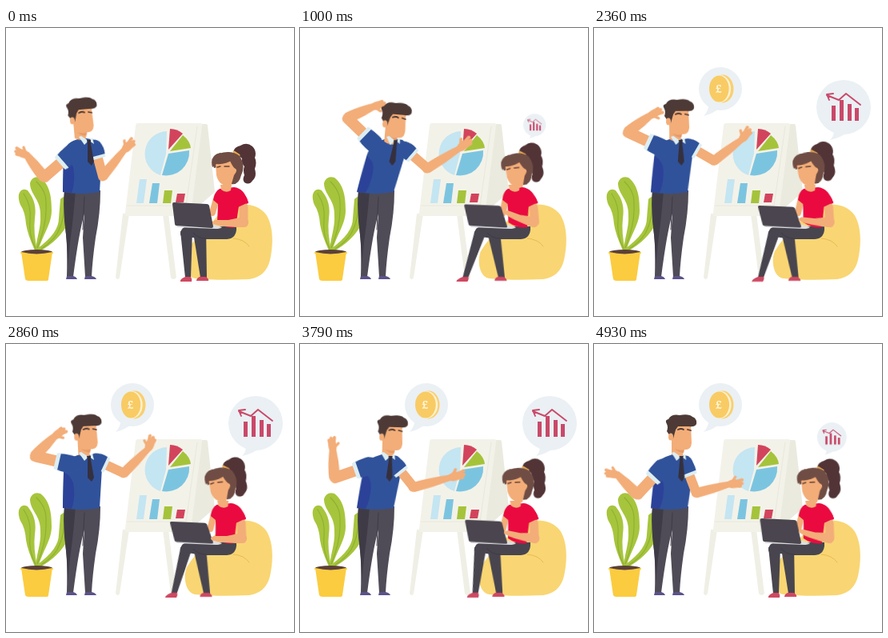
Write an HTML page without scripts that moves like this. It is 360 px wide and 360 px high and loops after 5000 ms.

```html
<!DOCTYPE html>
<html lang="en">
<head>
<meta charset="utf-8">
<title>Team presentation</title>
<style>
html, body { margin: 0; width: 100%; height: 100%; overflow: hidden; background: #fff; }
svg { display: block; width: 100vw; height: 100vh; }
svg * { animation: 5s ease-in-out infinite; }
.line { fill: none; stroke-linecap: round; stroke-linejoin: round; }
.skin { fill: #f3ad78; }
.skin-line { stroke: #f3ad78; }
.shirt { fill: #30529a; }
.cuff { fill: #dceef3; }
.trousers { fill: #4f4b57; }
.w-trousers { fill: #48454f; }
.bubble { fill: #eaf0f4; }
.leaf { fill: #a7c53c; }
.vein { stroke: #8fb034; stroke-width: 1.2; }

/* presenter */
.torso { animation-name: torso; transform-origin: 95px 205px; }
.head { animation-name: head; transform-origin: 111px 140px; }
.l-arm { animation-name: l-arm; }
.l-fore { animation-name: l-fore; }
.l-hand { animation-name: l-hand; }
.r-arm { animation-name: r-arm; }
.r-fore { animation-name: r-fore; }
.r-hand { animation-name: r-hand; }

@keyframes torso {
  0%, 57.2% { transform: skewX(0deg); }
  20% { transform: skewX(-14deg); }
  37.2% { transform: skewX(-8.5deg); }
  65.8% { transform: skewX(-5deg); }
  84.2% { transform: skewX(-11deg); }
  98.6%, 100% { transform: skewX(-5deg); }
}
@keyframes head {
  0% { transform: translate(-11px, -1.5px) rotate(-5deg); }
  20% { transform: translate(8px, 5px) rotate(5deg); }
  37.2% { transform: translate(1px, 2px) rotate(2deg); }
  57.2% { transform: translate(-6.5px, -.5px) rotate(-3deg); }
  65.8% { transform: translate(0, 0) rotate(0deg); }
  84.2% { transform: translate(9.5px, 1.5px) rotate(3deg); }
  98.6%, 100% { transform: translate(0, 0) rotate(0deg); }
}
@keyframes l-arm {
  0% { transform: translate(84px, 155px) rotate(139deg); }
  20% { transform: translate(94px, 146px) rotate(224deg); }
  37.2% { transform: translate(89px, 150px) rotate(217deg); }
  57.2% { transform: translate(83px, 151px) rotate(193deg); }
  65.8% { transform: translate(87px, 151px) rotate(184deg); }
  84.2% { transform: translate(90px, 152px) rotate(144deg); }
  98.6%, 100% { transform: translate(87px, 153px) rotate(133deg); }
}
@keyframes l-fore {
  0% { transform: translate(48px, 0) rotate(93deg); }
  20% { transform: translate(48px, 0) rotate(112deg); }
  37.2% { transform: translate(48px, 0) rotate(115deg); }
  57.2% { transform: translate(48px, 0) rotate(122deg); }
  65.8% { transform: translate(48px, 0) rotate(110deg); }
  84.2% { transform: translate(48px, 0) rotate(102deg); }
  98.6%, 100% { transform: translate(48px, 0) rotate(92deg); }
}
@keyframes l-hand {
  0% { transform: translate(35px, 0) rotate(-30deg); }
  20%, 65.8% { transform: translate(35px, 0) rotate(10deg); }
  84.2% { transform: translate(35px, 0) rotate(-10deg); }
  98.6%, 100% { transform: translate(35px, 0) rotate(-35deg); }
}
@keyframes r-arm {
  0% { transform: translate(111px, 148px) rotate(75deg); }
  20% { transform: translate(130px, 150px) rotate(41deg); }
  37.2% { transform: translate(121px, 148px) rotate(35deg); }
  57.2% { transform: translate(112px, 145px) rotate(25deg); }
  65.8% { transform: translate(116px, 147px) rotate(27deg); }
  84.2% { transform: translate(119px, 150px) rotate(69deg); }
  98.6%, 100% { transform: translate(114px, 150px) rotate(69deg); }
}
@keyframes r-fore {
  0% { transform: translate(39px, 0) rotate(-126deg) scaleX(1); }
  20% { transform: translate(39px, 0) rotate(-73deg) scaleX(1.1); }
  37.2% { transform: translate(39px, 0) rotate(-65deg) scaleX(1.03); }
  57.2% { transform: translate(39px, 0) rotate(-70deg) scaleX(1); }
  65.8% { transform: translate(39px, 0) rotate(-51deg) scaleX(1); }
  84.2% { transform: translate(39px, 0) rotate(-77deg) scaleX(1.18); }
  98.6%, 100% { transform: translate(39px, 0) rotate(-84deg) scaleX(1); }
}
@keyframes r-hand {
  0% { transform: translate(43px, 0) rotate(5deg); }
  20%, 37.2% { transform: translate(43px, 0) rotate(-8deg); }
  57.2% { transform: translate(43px, 0) rotate(-25deg); }
  65.8% { transform: translate(43px, 0) rotate(-14deg); }
  84.2%, 98.6%, 100% { transform: translate(43px, 0) rotate(8deg); }
}

/* seated colleague */
.w-torso { animation-name: w-torso; transform-origin: 280px 248px; }
.w-head { animation-name: w-head; transform-origin: 272px 195px; }
.pony { animation-name: pony; }
.w-fore { animation-name: w-fore; transform-origin: 297px 243px; }
.laptop { animation-name: laptop; transform-origin: 235px 248px; }
.near-shin { animation-name: near-shin; transform-origin: 226px 255px; }
.far-shin { animation-name: far-shin; transform-origin: 240px 255px; }

@keyframes w-torso {
  0% { transform: translate(0) skewX(0deg); }
  20% { transform: translate(-3px) skewX(5deg); }
  37.2% { transform: translate(-2px) skewX(5deg); }
  57.2%, 65.8% { transform: translate(-2px) skewX(2deg); }
  84.2% { transform: translate(-5px) skewX(2deg); }
  98.6%, 100% { transform: translate(-2px) skewX(2deg); }
}
@keyframes w-head {
  0% { transform: translate(0, 0) rotate(0deg); }
  20% { transform: translate(-3px, 2px) rotate(-6deg); }
  37.2% { transform: translate(-6px, 1px) rotate(-6deg); }
  57.2%, 65.8% { transform: translate(-6px, 0) rotate(-6deg); }
  84.2% { transform: translate(-1px, 0) rotate(0deg); }
  98.6%, 100% { transform: translate(-2px, 0) rotate(-3deg); }
}
@keyframes pony {
  0%, 84.2% { transform: translate(-1px, 0); }
  20%, 65.8% { transform: translate(-4px, -1px); }
  98.6%, 100% { transform: translate(-2px, 0); }
}
@keyframes w-fore {
  0% { transform: translate(0) rotate(0deg); }
  20%, 84.2% { transform: translate(-5px) rotate(20deg); }
  37.2% { transform: translate(-3px) rotate(12deg); }
  57.2%, 65.8% { transform: translate(-2px) rotate(0deg); }
  98.6%, 100% { transform: translate(-3px) rotate(14deg); }
}
@keyframes laptop {
  0% { transform: skewX(0deg); }
  20% { transform: skewX(6deg) scaleY(.92); }
  37.2%, 65.8% { transform: skewX(7deg) scaleY(.87); }
  84.2%, 98.6%, 100% { transform: skewX(1deg); }
}
@keyframes near-shin {
  0% { transform: skewX(0deg); }
  20%, 37.2% { transform: skewX(-20deg); }
  57.2% { transform: skewX(-17deg); }
  65.8% { transform: skewX(-13deg); }
  84.2% { transform: skewX(-5deg); }
  98.6%, 100% { transform: skewX(0deg); }
}
@keyframes far-shin {
  0%, 98.6%, 100% { transform: skewX(0deg); }
  20%, 37.2% { transform: skewX(5deg); }
  65.8% { transform: skewX(4deg); }
  84.2% { transform: skewX(1deg); }
}

/* speech bubbles */
.idea-coin { animation-name: idea-coin; animation-timing-function: linear; transform-origin: 140px 106px; }
.idea-chart { animation-name: idea-chart; animation-timing-function: linear; transform-origin: 280px 137px; }
.coin-face { animation: coin-turn 1.4s ease-in-out infinite alternate; transform-origin: 144px 76px; }

@keyframes idea-coin {
  0%, 25% { transform: scale(0); }
  31%, 100% { transform: scale(1); }
}
@keyframes idea-chart {
  0%, 17.4% { transform: scale(0); }
  20% { transform: scale(.41); }
  22.8% { transform: scale(.92); }
  24.2%, 96% { transform: scale(1); }
  98.6%, 100% { transform: scale(.54); }
}
@keyframes coin-turn {
  from { transform: scaleX(.97); }
  to { transform: scaleX(1.04); }
}
</style>
</head>
<body>
<svg viewBox="0 0 360 360">
  <defs>
    <g id="hand">
      <ellipse class="skin" cx="5" rx="8" ry="5.5"/>
      <path class="line skin-line" stroke-width="4.2" d="M7-2 16-3.5M7 1 15.5 1M6 3 13 4"/>
      <path class="line skin-line" stroke-width="3.4" d="M3-2 8-8"/>
    </g>
  </defs>

  <!-- plant -->
  <path class="leaf" d="M68 214Q73 208 77 214V245Q66 266 42 279L39 276C58 262 66 250 66 238Z"/>
  <path class="leaf" d="M16 208Q19 199 27 203C36 214 38 225 36 238Q34 255 39 278H36Q27 258 25 245Q24 230 18 221Q15 214 16 208Z"/>
  <path class="leaf" d="M30 194Q33 184 43 187C55 196 57 212 57 228C57 245 46 258 40 279H37C38 262 44 250 43 234C44 215 30 208 30 194Z"/>
  <path class="line vein" d="M22 207Q32 222 30 240T37 276M38 192C52 206 50 216 50 228Q50 248 39 275M73 218Q74 238 64 257Q57 268 44 276"/>
  <path d="M19 280 24 314Q25 316 28 316H50Q53 316 53 314L58 280Z" fill="#fbcc40"/>
  <ellipse cx="38.5" cy="280" rx="19.5" ry="3" fill="#5b4039"/>
  <path d="M19 281Q38 286 58 281" class="line" stroke="#fbcc40" stroke-width="2"/>

  <!-- easel -->
  <path d="M146 232H154L142 312Q140 316 137 312ZM196 232H203L213 312Q209 316 206 312Z" fill="#efefe5"/>
  <path d="M240 120H250Q252 120 252 122L261 205 230 232Z" fill="#eaeadf"/>
  <path d="M165 119H243Q246 119 245 123L231 233Q231 235 228 235H151Q148 235 149 231L162 122Q162 119 165 119Z" fill="#f3f2e9"/>
  <path d="M239 123 225 222H151" class="line" stroke="#e9e8dc"/>
  <path d="M201 129A28.2 28.2 0 0 0 193 184L200 157Z" fill="#c4e5f2"/>
  <path d="M203 157 229 153A29 29 0 0 1 195 184Z" fill="#7bc4e0"/>
  <path d="M205 154 221 134Q230 141 231 150Z" fill="#a5c33a"/>
  <path d="M203 152 205 126Q214 126 221 132Z" fill="#d2445c"/>
  <path d="M167 189H176L172 219H163Z" fill="#c4e5f2"/>
  <path d="M183 194H192L189 219H179Z" fill="#7bc4e0"/>
  <path d="M198 203H208L206 219H196Z" fill="#a5c33a"/>
  <path d="M214 207H224L222 218H212Z" fill="#d2445c"/>

  <!-- coin bubble -->
  <g class="idea-coin">
    <path class="bubble" d="M144 94Q143 104 137 110Q149 107 157 100Z"/>
    <circle class="bubble" cx="158" cy="76" r="27"/>
    <ellipse cx="161" cy="76" rx="13.5" ry="17.5" fill="#f8d070"/>
    <g class="coin-face">
      <ellipse cx="158" cy="76" rx="13.5" ry="17" fill="#fdf1d2"/>
      <ellipse cx="156.5" cy="76" rx="12.5" ry="16.5" fill="#f8cb64"/>
      <text x="156" y="81" text-anchor="middle" font-family="Noto Serif, serif" font-size="14" font-weight="700" fill="#fff6de">£</text>
    </g>
  </g>

  <!-- chart bubble -->
  <g class="idea-chart">
    <path class="bubble" d="M299 122Q302 134 295 140Q309 137 317 130Z"/>
    <circle class="bubble" cx="312" cy="99" r="34"/>
    <path d="M297 97h5v19h-5zM307 90h5v26h-5zM317 95h5v21h-5zM326 100h5v16h-5z" fill="#ca4969"/>
    <path class="line" stroke="#ca4969" stroke-width="1.9" d="M333 96 315 82 306 90 291 84M299 82 291 83 294 90"/>
  </g>

  <!-- presenter -->
  <path class="trousers" d="M73 203H118Q118 232 112 262Q108 290 107 311H99L96 262 98 232Q91 256 84 311H76Q77 276 75 258Q71 229 73 203Z"/>
  <path d="M73 203H87Q84 240 80 268L77 298Q77 276 75 258Q71 229 73 203Z" fill="#3f3b46"/>
  <path d="M98 211 96 252" class="line" stroke="#3f3b46"/>
  <path d="M76 310H84Q88 311 89 314H75ZM99 310H107Q112 311 113 314H98Z" fill="#5c5288"/>
  <g class="torso">
    <path class="shirt" d="M95 137 84 141Q72 146 72 162L71 205Q94 209 117 205L120 155Q120 145 112 140Z"/>
    <path d="M72 160Q84 166 85 180Q86 196 82 206L71 205Z" fill="#2b4298"/>
  </g>
  <g class="l-arm">
    <path class="line skin-line" stroke-width="14" d="M10 0H46"/>
    <g class="l-fore">
      <path class="skin" d="M0-7Q14-8 37-4V4Q18 7 0 7Q-7 4-7 0T0-7Z"/>
      <g class="l-hand"><use href="#hand" transform="scale(.95 -.95)"/></g>
    </g>
    <path class="shirt" d="M0-11Q10-12 19-10V10Q8 12 0 11Q-9 8-9 0T0-11Z"/>
    <path class="cuff" d="M17-11 22-10V10L17 11Z"/>
  </g>
  <g class="r-arm">
    <path class="line skin-line" stroke-width="12" d="M8 0H38"/>
    <g class="r-fore">
      <path class="skin" d="M0-6Q15-7 45-3.5V3.5Q20 6 0 6Q-6 4-6 0T0-6Z"/>
      <g class="r-hand"><use href="#hand"/></g>
    </g>
    <path class="shirt" d="M0-9Q7-11 13-9.5V9.5Q6 11 0 9Q-8 7-8 0T0-9Z"/>
    <path class="cuff" d="M12-10 16-9.5V9.5L12 10Z"/>
  </g>
  <g class="head">
    <path class="skin" d="M97 99H121L122 124Q121 132 115 132H112L111 140Q104 143 97 138V121Z"/>
    <path d="M101 131Q107 134 113 132L112 136Q106 136 101 131Z" fill="#e39a68"/>
    <path d="M95 115 91 109Q93 104 91 100Q88 95 93 94Q97 87 107 89Q119 87 123 91Q129 93 128 100Q126 104 119 103L105 103Q102 106 101 111L99 118 97 117Z" fill="#4d3a36"/>
    <ellipse class="skin" cx="96" cy="116" rx="3" ry="4.5"/>
    <path class="line" stroke="#4d3a36" stroke-width="1.8" d="M105 107Q109 105 112 107M117 107 121 108"/>
  </g>
  <g class="torso">
    <path class="cuff" d="M91 136 94 135 103 141 98 146ZM108 137 104 141 110 145Z"/>
    <path d="M101 140 106 140 106 145 110 167 107 172 102 167 102 145Z" fill="#35303f"/>
  </g>

  <!-- beanbag -->
  <path d="M270 228C290 217 313 218 325 233C335 248 334 272 330 290Q325 311 304 314Q265 316 236 313C224 311 221 290 226 279Q236 262 250 252Z" fill="#f9d673"/>
  <path d="M284 263Q298 264 304 273" class="line" stroke="#e7bb54"/>

  <!-- colleague -->
  <g class="far-shin">
    <path class="w-trousers" d="M233 249H250L251 312H243Z"/>
    <path d="M242 311H250Q254 314 253 316H238Q238 313 242 311Z" fill="#cf4861"/>
  </g>
  <path class="w-trousers" d="M218 258Q218 248 229 248H288Q289 263 276 264L248 264 219 260Z"/>
  <g class="near-shin">
    <path class="w-trousers" d="M218 254H233L231 312H224Z"/>
    <path d="M224 311H231Q233 314 232 317H218Q217 314 224 311Z" fill="#cf4861"/>
  </g>
  <path d="M234 256Q240 263 250 263" class="line" stroke="#3d3b45"/>
  <g class="w-torso">
    <path class="line skin-line" stroke-width="8" d="M264 210 258 231"/>
    <path d="M267 201 285 199Q298 200 303 219L291 223 287 249Q275 251 264 243L265 220 259 215Q261 204 267 201Z" fill="#ea0a40"/>
    <path class="skin" d="M268 196H282L281 203Q275 207 269 202Z"/>
    <path class="line skin-line" stroke-width="11" d="M297 224V242"/>
    <path d="M289 206Q299 204 303 218L290 224Z" fill="#ea0a40"/>
  </g>
  <path d="M212 246H261L270 249Q268 251 262 251L214 249Z" fill="#dcdde0"/>
  <g class="laptop">
    <path d="M210 218 251 220Q253 220 254 222L259 248Q259 250 257 250L213 247Q211 247 211 245L208 220Q208 218 210 218Z" fill="#4a454e"/>
  </g>
  <g class="w-fore">
    <path class="skin" d="M298 249Q280 249 266 247L259 245Q256 242 262 240L278 240 297 236Q304 239 303 244T298 249Z"/>
  </g>
  <g class="w-head">
    <g class="pony">
      <path d="M285 156C286 149 291 148 294 147Q302 142 309 148Q315 154 312 162Q315 168 312 176Q315 186 309 191Q305 197 299 193Q296 189 299 184Q297 178 299 173Q295 169 296 163Q291 158 285 156Z" fill="#523437"/>
      <path class="line" stroke="#e8a94f" stroke-width="3" d="M286 155 292 159"/>
    </g>
    <path d="M260 175Q255 160 266 157Q282 152 292 160Q300 172 294 184Q291 197 281 195L264 174Z" fill="#704d44"/>
    <path class="skin" d="M262 169Q272 170 280 166Q284 175 287 176Q290 178 285 184L281 198Q266 198 263 184Z"/>
    <path d="M258 174Q254 159 268 156L283 165Q274 171 263 170Z" fill="#704d44"/>
    <path class="line" stroke="#674138" stroke-width="1.3" d="M264 174 268 173M273 173 279 173"/>
  </g>
</svg>
</body>
</html>
```
